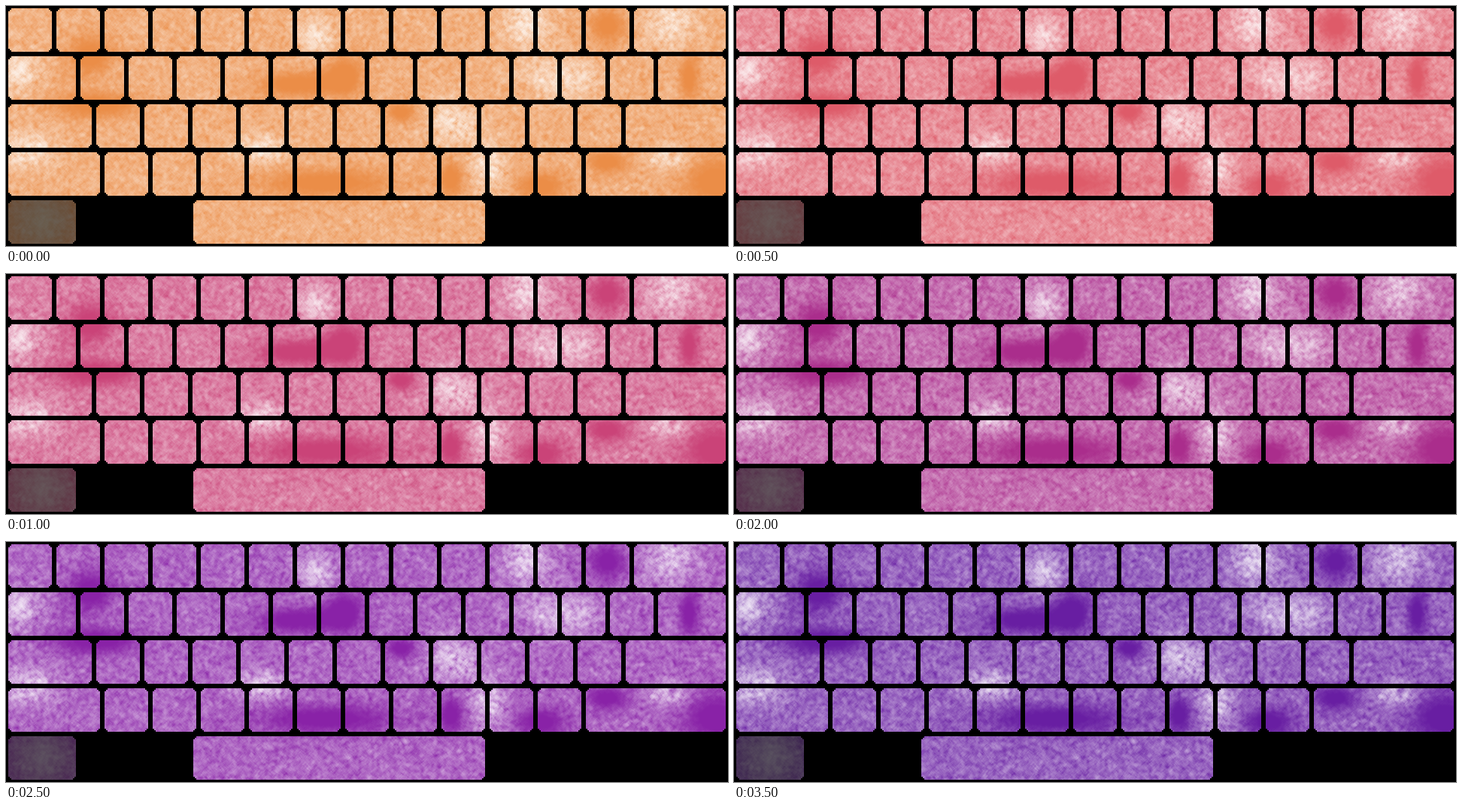
Animation of 960 by 320 pixels, one loop 4 s. Source, as an HTML page with a canvas:

```html
<!DOCTYPE html>
<html lang="en">
<head>
<meta charset="utf-8">
<title>Keyboard glow</title>
<style>
  html, body { margin: 0; width: 100%; height: 100%; overflow: hidden; background: #000; }
  #board {
    width: 960px; height: 320px;
    animation: hue 4s step-end infinite;
  }
  canvas { display: block; }
  @keyframes hue {
    0%    { background: #eb8d47; }
    12.5% { background: #de5b69; }
    25%   { background: #ca4378; }
    50%   { background: #aa2d8c; }
    62.5% { background: #8922a7; }
    87.5% { background: #681ea2; }
  }
</style>
</head>
<body>
<div id="board"><canvas id="keys" width="960" height="320"></canvas></div>
<script>
const W = 960, H = 320, SIZE = 58, PITCH = 64, RIGHT = 957;
const ctx = document.getElementById('keys').getContext('2d');

// Soft clouds spread across the board: x, y, horizontal and vertical radius.
const light = [
  [692, 24, 30, 36], [884, 22, 34, 34], [18, 86, 26, 26], [30, 192, 38, 24],
  [342, 190, 34, 20], [594, 156, 30, 30], [412, 40, 26, 24], [740, 96, 50, 24],
  [642, 212, 20, 34], [882, 203, 26, 16]
];
const dark = [
  [112, 66, 30, 28], [120, 132, 60, 18], [386, 104, 56, 18], [450, 92, 26, 28],
  [426, 236, 92, 20], [592, 230, 16, 26], [712, 240, 34, 20], [908, 94, 14, 34],
  [800, 26, 24, 24], [800, 208, 28, 16], [944, 234, 48, 36], [525, 142, 20, 14]
];

let seed = 7;
function random() {
  seed = (seed * 1664525 + 1013904223) >>> 0;
  return seed / 4294967296;
}

function cloud(list, x, y) {
  return list.reduce((sum, [cx, cy, rx, ry]) =>
    sum + Math.exp(-(((x - cx) / rx) ** 2) - ((y - cy) / ry) ** 2), 0);
}

// Share of white that should cover the base colour at a point.
function whiteness(x, y) {
  const level = 0.36 + 0.38 * cloud(light, x, y) - 0.36 * cloud(dark, x, y);
  return Math.max(0, Math.min(level, 0.86));
}

// Many translucent diamonds build up the mottled surface.
function paintTexture() {
  const layers = 14;
  ctx.fillStyle = '#fff';
  for (let n = W * H / 2; n > 0; n--) {
    const x = random() * W, y = random() * H, r = 3 + random() * 1.5;
    ctx.globalAlpha = 1 - (1 - whiteness(x, y)) ** (1 / layers);
    ctx.beginPath();
    ctx.moveTo(x - r, y);
    ctx.lineTo(x, y - r);
    ctx.lineTo(x + r, y);
    ctx.lineTo(x, y + r);
    ctx.fill();
  }
  ctx.globalAlpha = 1;
}

function dimKey(x, y, w) {
  const cx = x + w / 2, cy = y + SIZE / 2;
  const glow = ctx.createRadialGradient(cx, cy, 4, cx, cy, 54);
  glow.addColorStop(0, 'rgba(100, 104, 98, 0.55)');
  glow.addColorStop(1, 'rgba(80, 80, 75, 0.05)');
  for (const fill of ['rgba(0, 0, 0, 0.54)', glow]) {
    ctx.fillStyle = fill;
    ctx.fillRect(x, y, w, SIZE);
  }
}

// Key outline with stepped corners.
function addKey(path, x, y, w) {
  for (const [a, b] of [[4, 0], [2, 2], [0, 4]]) {
    path.rect(x + a, y + b, w - 2 * a, SIZE - 2 * b);
  }
}

// Each row starts with a wide key, then square keys, then fills to the right edge.
function addRow(path, y, firstWidth, squares) {
  addKey(path, 3, y, firstWidth);
  let x = 3 + firstWidth + 6;
  for (let k = 0; k < squares; k++, x += PITCH) addKey(path, x, y, SIZE);
  addKey(path, x, y, RIGHT - x);
}

const keys = new Path2D();
[58, 90, 111, 122].forEach((firstWidth, row) =>
  addRow(keys, 3 + row * PITCH, firstWidth, [12, 12, 11, 10][row]));
addKey(keys, 3, 259, 90);
addKey(keys, 249, 259, 388);

paintTexture();
dimKey(3, 259, 90);

// Black everywhere between the keys.
const gaps = new Path2D();
gaps.rect(0, 0, W, H);
ctx.fillStyle = '#000';
ctx.save();
ctx.clip(keys);
ctx.globalCompositeOperation = 'copy';
ctx.drawImage(ctx.canvas, 0, 0);
ctx.restore();
const mask = document.createElement('canvas');
mask.width = W;
mask.height = H;
const maskCtx = mask.getContext('2d');
maskCtx.fill(gaps);
maskCtx.globalCompositeOperation = 'destination-out';
maskCtx.fill(keys);
ctx.drawImage(mask, 0, 0);
</script>
</body>
</html>
```
